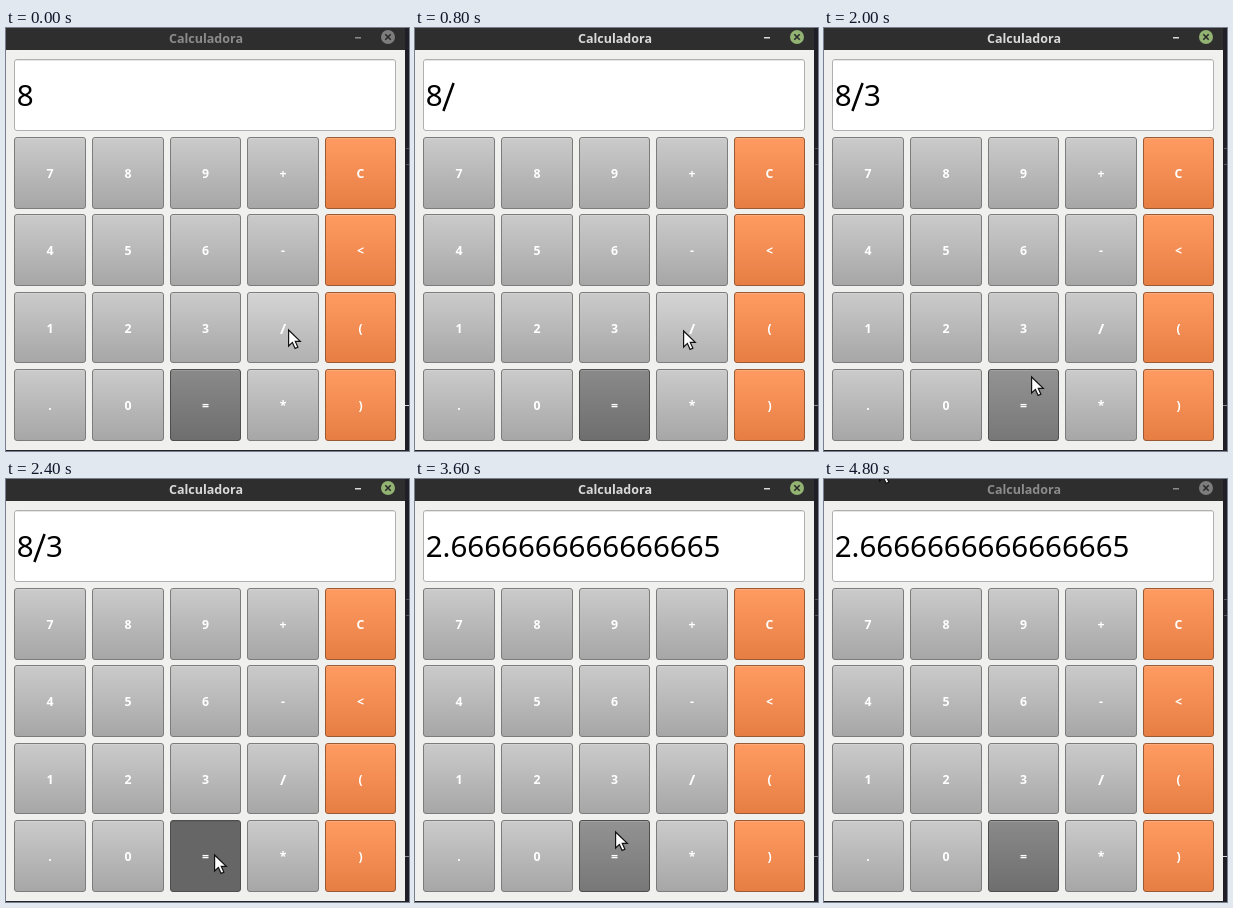
Recreate the animation shown at these times as an HTML page with a canvas. Size 403 by 423 pixels, loop 4.9 s.

```html
<!DOCTYPE html>
<html lang="pt">
<head>
<meta charset="utf-8">
<title>Calculadora</title>
<style>
  html, body { margin: 0; width: 100%; height: 100%; overflow: hidden; background: #f0f0ef; }
  canvas { display: block; }
</style>
</head>
<body>
<canvas id="stage" width="403" height="423"></canvas>
<script>
const c = document.getElementById('stage').getContext('2d');
const LOOP = 4900;
const FONT = '"Noto Sans", "Open Sans", sans-serif';
const KEYS = ['789+C', '456-<', '123/(', '.0=*)'];

// Pointer positions: [time, x, y], held until the next entry
const POINTER = [
  [0, 282, 301],
  [800, 268, 302], [900, 245, 305], [1000, 225, 307], [1100, 211, 308], [1200, 206, 309],
  [1400, 196, 309], [1500, 188, 309],
  [2000, 207, 348], [2100, 208, 366], [2200, 208, 375],
  [3600, 200, 352], [3700, 176, 285], [3800, 142, 192], [3900, 106, 104],
  [4000, 78, 40], [4100, 63, 10], [4200, 55, -15], [4300, 55, -40],
  [4700, 57, -17], [4800, 55, -15]
];
const ENTRY = [[0, '8'], [500, '8/'], [1800, '8/3'], [2700, '2.6666666666666665']];

// Top, bottom, pressed, border
const SKINS = {
  grey: ['#cbcbcb', '#a6a6a6', '#999999', '#7c7c7c'],
  dark: ['#8a8a8a', '#6e6e6e', '#666666', '#4e4e4e'],
  orange: ['#ff9b62', '#e67e43', '#d9733a', '#9a5a34']
};
const HOVER = { grey: ['#d5d5d5', '#b0b0b0'], dark: ['#939393', '#777777'], orange: ['#ffa774', '#ec8950'] };

const at = (list, t) => list.filter(e => e[0] <= t).pop();

function rect(x, y, w, h, fill) {
  c.fillStyle = fill;
  c.fillRect(x, y, w, h);
}

function panel(x, y, w, h, fill, border) {
  c.beginPath();
  c.roundRect(x + .5, y + .5, w - 1, h - 1, 2.5);
  c.fillStyle = fill;
  c.fill();
  c.strokeStyle = border;
  c.lineWidth = 1;
  c.stroke();
}

function text(s, x, y, font, fill, align = 'center') {
  c.font = font + ' ' + FONT;
  c.textAlign = align;
  c.fillStyle = fill;
  c.fillText(s, x, y);
}

function drawFrame(active) {
  rect(0, 0, 403, 423, '#f0f0ef');
  rect(0, 0, 400, 22, '#2e2e2e');
  rect(399, 0, 4, 423, '#201e26');
  rect(0, 422, 403, 1, '#25232a');
  rect(400, 120, 3, 1, '#55535b');
  rect(400, 136, 3, 1, '#55535b');
  rect(399, 377, 4, 1, active ? '#8b8a8e' : '#d8d8d8');

  const ink = active ? '#dadada' : '#8c8c8c';
  text('Calculadora', 200, 15, 'bold 12.5px', ink);
  rect(349, 9, 6, 1.5, ink);
  c.beginPath();
  c.arc(382, 9, 7, 0, 7);
  c.fillStyle = active ? '#92b372' : '#7d7d7d';
  c.fill();
  c.beginPath();
  c.moveTo(379.3, 6.3); c.lineTo(384.7, 11.7);
  c.moveTo(384.7, 6.3); c.lineTo(379.3, 11.7);
  c.strokeStyle = '#2a2a2a';
  c.lineWidth = 1.6;
  c.stroke();
}

function drawEntry(s) {
  panel(8, 31, 382, 72, '#ffffff', '#b0b0b0');
  rect(10, 32, 378, 1, '#e6e6e6');
  const y = 78, font = '29.5px';
  if (s[1] !== '/') return text(s, 10.7, y, font, '#000', 'left');
  text('8/', 10.7, y, font, '#000', 'left');
  // Slash is wider and reaches below the baseline
  rect(27, 50, 14, 38, '#ffffff');
  c.beginPath();
  c.moveTo(28.4, 83); c.lineTo(38.6, 55);
  c.strokeStyle = '#000';
  c.lineWidth = 2.5;
  c.stroke();
  if (s[2]) text(s[2], 40, y, font, '#000', 'left');
}

function drawKey(label, col, row, px, py, held) {
  const x = Math.round(8 + 77.75 * col), y = Math.round(109 + 77.4 * row);
  const w = Math.round(80 + 77.5 * col) - x, h = Math.round(180.6 + 77.4 * row) - y;
  const kind = col === 4 ? 'orange' : label === '=' ? 'dark' : 'grey';
  const skin = SKINS[kind];
  const over = px >= x && px < x + w && py >= y && py < y + h;
  const [top, bottom] = over ? HOVER[kind] : skin;
  let fill = skin[2];
  if (held !== label) {
    fill = c.createLinearGradient(0, y, 0, y + h);
    fill.addColorStop(0, top);
    fill.addColorStop(1, bottom);
  }
  panel(x, y, w, h, fill, skin[3]);
  rect(x + 2, y + 1, w - 4, 1, held === label ? 'rgba(0,0,0,.08)' : 'rgba(255,255,255,.15)');
  const big = label === '/';
  text(label, x + w / 2, y + h / 2 + (big ? 6 : 5), big ? 'bold 15px' : 'bold 12.3px', '#ffffff');
}

function drawPointer(x, y) {
  const p = new Path2D('M.6 1V17L4.4 13.4L7.1 19.4L9.9 18.2L7.3 12.4H12.3Z');
  c.save();
  c.translate(x, y);
  c.fillStyle = '#fff';
  c.fill(p);
  c.strokeStyle = '#111';
  c.lineWidth = 1.2;
  c.stroke(p);
  c.restore();
}

function draw(now) {
  const t = now % LOOP;
  const [, px, py] = at(POINTER, t);
  const held = t >= 400 && t < 500 ? '/' : t >= 2400 && t < 2700 ? '=' : '';
  drawFrame(t >= 500 && t < 4600);
  drawEntry(at(ENTRY, t)[1]);
  KEYS.forEach((line, row) => [...line].forEach((k, col) => drawKey(k, col, row, px, py, held)));
  drawPointer(px, py);
}

const start = performance.now();
function tick() {
  draw(performance.now() - start);
  requestAnimationFrame(tick);
}
tick();
</script>
</body>
</html>
```
